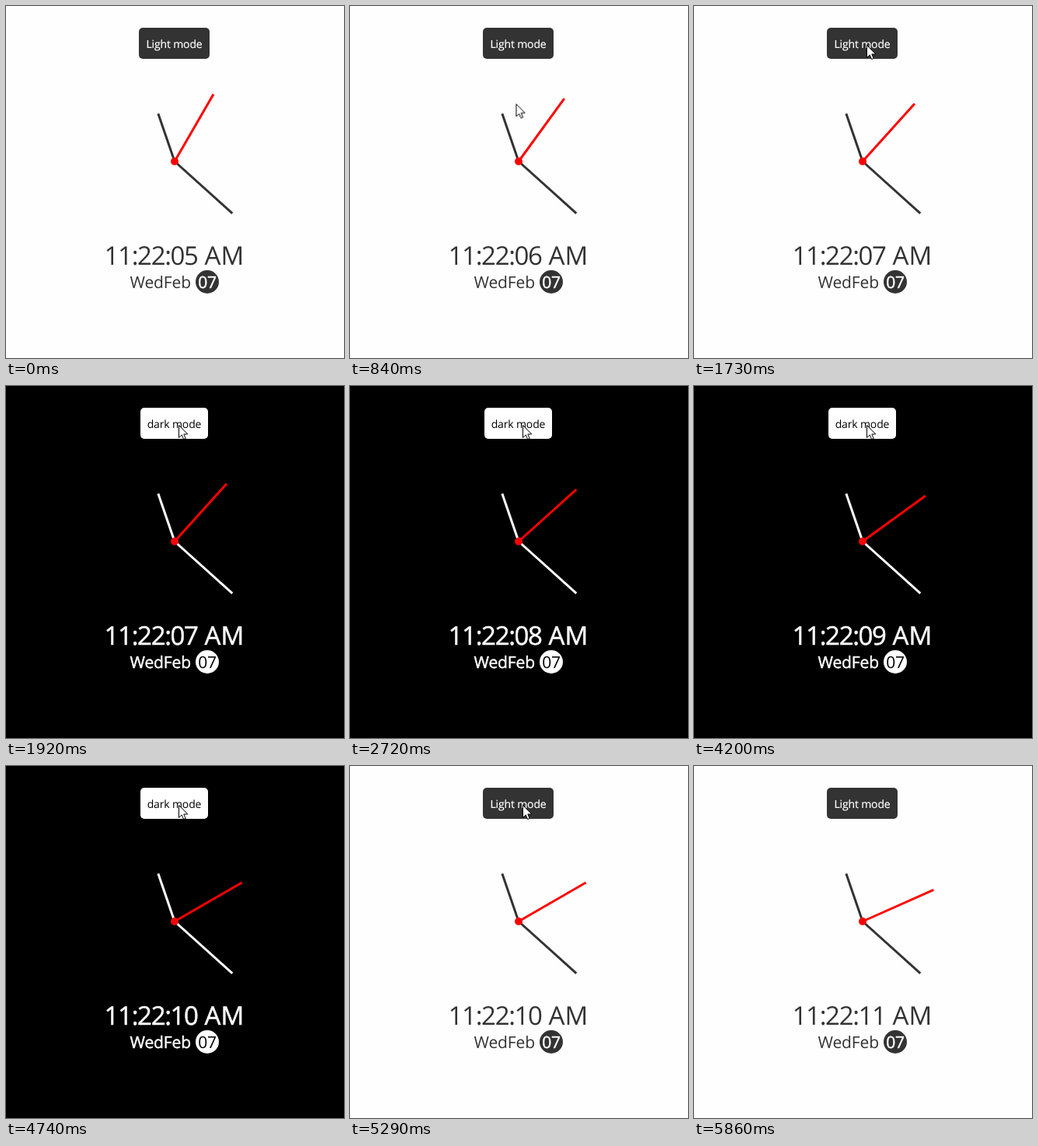
Recreate the animation shown at these times as an HTML page. Size 435 by 453 pixels, loop 6420 ms.

```html
<!DOCTYPE html>
<html lang="en">
<head>
<meta charset="utf-8">
<title>Clock with theme switch</title>
<style>
  html, body { margin: 0; width: 100%; height: 100%; overflow: hidden; }
  svg {
    display: block;
    width: 435px;
    height: 453px;
    background: var(--paper);
    font-family: "Open Sans", "Noto Sans", sans-serif;
    text-rendering: geometricPrecision;
    animation: theme 6420ms step-end infinite, tick 6420ms step-end infinite;
  }
  .ink { fill: var(--ink); }
  .back { fill: var(--paper); }
  .hand { stroke: var(--ink); stroke-width: 3; }
  .time { font-size: 33px; letter-spacing: -1.3px; }
  .date { font-size: 21px; letter-spacing: -.15px; }
  .label { font-size: 14px; letter-spacing: -.15px; text-anchor: middle; }
  /* light text on a dark ground looks a little heavier */
  .time, text.ink { stroke: var(--ink); stroke-width: calc(var(--dark) * .5px); }
  text.back { stroke: var(--paper); stroke-width: calc((1 - var(--dark)) * .5px); }
  .light { opacity: calc(1 - var(--dark)); }
  .light text { stroke: #fff; stroke-width: .2px; }
  .dark { opacity: var(--dark); }
  .second { transform: rotate(calc(var(--s) * 6deg)); }
  .digits { transform: translateY(calc((5 - var(--s)) * 50px)); }
  .cursor { animation: point 6420ms linear infinite; }

  @keyframes theme {
    0%, 53.738%, 82.399%, 100% { --dark: 0; --ink: #333; --paper: #fefefe; }
    29.907%, 65.421% { --dark: 1; --ink: #fff; --paper: #000; }
  }
  @keyframes tick {
    0% { --s: 5; }
    11.371% { --s: 6; }
    26.947% { --s: 7; }
    42.368% { --s: 8; }
    58.1% { --s: 9; }
    73.832% { --s: 10; }
    89.408%, 100% { --s: 11; }
  }
  @keyframes point {
    0% { transform: translate(154px, 470px); animation-timing-function: step-end; }
    6.542% { transform: translate(154px, 427px); animation-timing-function: cubic-bezier(.3, .3, .6, 1); }
    15.888% { transform: translate(222px, 82px); }
    16.667% { transform: translate(224px, 70px); }
    17.445%, 20.5% { transform: translate(226px, 62px); }
    20.561% { transform: translate(224px, 55px); }
    21.028% { transform: translate(222px, 50px); }
    84.735% { transform: translate(222px, 50px); animation-timing-function: cubic-bezier(.4, 0, .8, .75); }
    91.277%, 100% { transform: translate(144px, 456px); }
  }
</style>
</head>
<body>
<svg viewBox="0 0 435 453">
  <defs>
    <clipPath id="row"><rect x="205" y="300" width="48" height="40"/></clipPath>
  </defs>

  <g class="light">
    <rect class="ink" x="171" y="28" width="91" height="40" rx="5"/>
    <text class="label" x="216.5" y="54" fill="#fff">Light mode</text>
  </g>
  <g class="dark">
    <rect class="ink" x="173" y="28" width="87" height="40" rx="5"/>
    <text class="label" x="216.5" y="54">dark mode</text>
  </g>

  <g transform="translate(217 200)">
    <line class="hand" y2="-65" transform="rotate(341)"/>
    <line class="hand" y2="-100" transform="rotate(132)"/>
    <line class="second" y2="-100" stroke="red" stroke-width="3"/>
    <circle r="5" fill="red"/>
  </g>

  <g class="time ink">
    <text x="126.5" y="332.5">11:22:</text>
    <g clip-path="url(#row)">
      <g class="digits">
        <text x="211.5" y="332.5">05</text>
        <text x="211.5" y="382.5">06</text>
        <text x="211.5" y="432.5">07</text>
        <text x="211.5" y="482.5">08</text>
        <text x="211.5" y="532.5">09</text>
        <text x="211.5" y="582.5">10</text>
        <text x="211.5" y="632.5">11</text>
      </g>
    </g>
    <text x="255.5" y="332.5" style="letter-spacing: 0">AM</text>
  </g>

  <g class="date">
    <text class="ink" x="159.6" y="363">WedFeb</text>
    <circle class="ink" cx="259" cy="355" r="15"/>
    <text class="back" x="259" y="363" text-anchor="middle">07</text>
  </g>

  <g class="cursor">
    <path d="M.5 .5V16.5L4.2 13L6.7 18.6L9.2 17.5L6.8 12H11.8Z" fill="#fff" stroke="#000"/>
  </g>
</svg>
</body>
</html>
```
